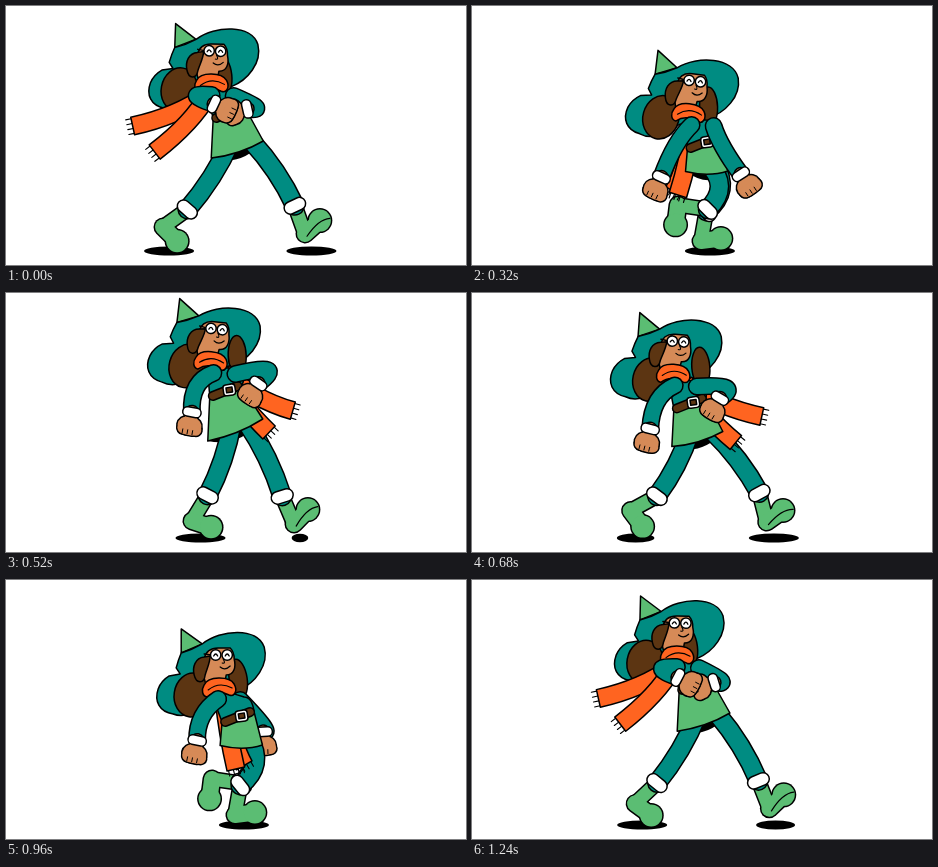
Recreate the animation shown at these times as an HTML page with a canvas. Size 460x259 px, loop 1280 ms.

```html
<!DOCTYPE html>
<html lang="en">
<head>
<meta charset="utf-8">
<title>Walk cycle</title>
<style>
html, body { margin: 0; width: 100%; height: 100%; overflow: hidden; background: #fff; }
canvas { display: block; width: 460px; height: 259px; }
</style>
</head>
<body>
<canvas id="stage" width="460" height="259"></canvas>
<script>
const LOOP = 1280, HALF = LOOP / 2, STEP = 40, INK = 1.5;
const TEAL = '#008c82', GREEN = '#5bbd73', ORANGE = '#ff6420', SKIN = '#d68a57', HAIR = '#5c3512', BLACK = '#000', WHITE = '#fff';
const c = document.getElementById('stage').getContext('2d');
c.lineJoin = c.lineCap = 'round';

// Key poses; each row starts with its time in ms.
// Head height over one step
const BOUNCE = [[0, 45], [160, 63], [240, 73], [320, 75], [400, 54], [520, 36], [600, 43]];
// Heel position and boot tilt over two steps
const BOOT = [
  [0, 299, 228, -42], [160, 261, 235, -8], [320, 229, 235, -7], [400, 200, 236, -8], [520, 186, 228, 18],
  [640, 157, 221, 45], [840, 182, 203, 82], [960, 206, 199, 97], [1040, 251, 214, 48], [1160, 288, 231, -46]
];
// Elbow and hand, measured from the head
const ARM_L = [
  [0, -18, 45, 12, 59], [160, -35, 65, -5, 69], [320, -19, 65, -39, 109],
  [520, -20, 58, -27, 97], [840, -21, 62, -35, 105], [1040, -18, 61, -18, 92]
];
const ARM_R = [
  [0, 41, 56, 19, 61], [160, 39, 69, 40, 96], [320, 29, 67, 54, 105],
  [520, 51, 41, 34, 66], [840, 44, 57, 37, 75], [1040, 41, 76, 45, 98]
];

const mod = (t, period) => ((t % period) + period) % period;
const clamp = x => Math.max(0, Math.min(1, x));
const rad = deg => deg * Math.PI / 180;
const polar = deg => [Math.cos(rad(deg)), Math.sin(rad(deg))];
// Cosine that peaks at the given time
const wave = (t, peak, period = LOOP) => Math.cos(2 * Math.PI * (t - peak) / period);

// Periodic cubic that never overshoots its keys
function sample(keys, time, period = LOOP) {
  const n = keys.length, t = mod(time, period);
  let i = n - 1;
  while (keys[i][0] > t) i--;
  const row = k => keys[(k + n) % n];
  const gap = k => mod(row(k + 1)[0] - row(k)[0], period);
  const h = gap(i), u = (t - row(i)[0]) / h, v = 1 - u;
  const slope = (k, j) => (row(k + 1)[j] - row(k)[j]) / gap(k);
  const tangent = (k, j) => {
    const a = slope(k - 1, j), b = slope(k, j);
    return a * b > 0 ? 2 * a * b / (a + b) : 0;
  };
  return row(i).slice(1).map((a, k) => {
    const j = k + 1, b = row(i + 1)[j];
    return a * v * v * (1 + 2 * u) + b * u * u * (3 - 2 * u)
      + h * u * v * (v * tangent(i, j) - u * tangent(i + 1, j));
  });
}

const add = (p, x, y) => [p[0] + x, p[1] + y];
const off = (p, d, k) => add(p, d[0] * k, d[1] * k);
const mix = (a, b, k) => [a[0] + (b[0] - a[0]) * k, a[1] + (b[1] - a[1]) * k];
const dist = (a, b) => Math.hypot(b[0] - a[0], b[1] - a[1]);
const unit = (a, b) => {
  const d = dist(a, b) || 1;
  return [(b[0] - a[0]) / d, (b[1] - a[1]) / d];
};
const normal = d => [-d[1], d[0]];
// Control point of a quadratic that passes through m
const through = (a, m, b) => [2 * m[0] - (a[0] + b[0]) / 2, 2 * m[1] - (a[1] + b[1]) / 2];

const svg = d => new Path2D(d);
const seg = (a, b) => svg(`M${a}L${b}`);
const curve = (a, m, b) => svg(`M${a}Q${m} ${b}`);
function oval(x, y, rx, ry, tilt = 0) {
  const p = new Path2D();
  p.ellipse(x, y, rx, ry, tilt, 0, 7);
  return p;
}
function line(path, width = INK, color = BLACK) {
  c.lineWidth = width;
  c.strokeStyle = color;
  c.stroke(path);
}
function fill(path, color) {
  c.fillStyle = color;
  c.fill(path);
}
function shape(path, color) {
  fill(path, color);
  line(path);
}
// Thick strokes merged under one outline
function blob(parts, color) {
  parts.forEach(([p, w]) => line(p, w + 2 * INK));
  parts.forEach(([p, w]) => line(p, w, color));
}
function cuff(p, dir, half, width) {
  const n = normal(dir);
  blob([[seg(off(p, n, -half), off(p, n, half)), width]], WHITE);
}
function placed([x, y], angle, paint) {
  c.save();
  c.translate(x, y);
  c.rotate(angle);
  paint();
  c.restore();
}

function arm(shoulder, keys, t, head) {
  const [ex, ey, hx, hy] = sample(keys, t);
  const elbow = add(head, ex, ey), hand = add(head, hx, hy);
  const d = unit(elbow, hand), n = normal(d);
  const wrist = off(hand, d, -14), tip = off(hand, d, 3);
  blob([[curve(shoulder, through(shoulder, elbow, wrist), wrist), 15]], TEAL);
  blob([
    [seg(wrist, hand), 12],
    [seg(off(hand, n, -3), off(hand, n, 3)), 18],
    [seg(off(tip, n, -7), off(tip, n, 6)), 11]
  ], SKIN);
  [-4, 1, 6].forEach(i => line(seg(off(off(hand, d, 4), n, i), off(off(hand, d, 8), n, i)), 1));
  cuff(wrist, d, 4.5, 8);
}

function leg(t, pelvis) {
  const [x, y, tilt] = sample(BOOT, t);
  const heel = [x, y], d = polar(tilt), n = normal(d), toe = off(heel, d, 20);
  const ankle = off(heel, polar(.85 * tilt - 74), 30);
  const hip = add(pelvis, 4 + 11 * wave(t, 60), -8);
  const bend = Math.max(3, (80 - dist(hip, ankle)) * .35);
  const knee = off(mix(hip, ankle, .5), normal(unit(hip, ankle)), -bend);
  const m = through(hip, knee, ankle);
  blob([[seg(ankle, heel), 13], [seg(heel, toe), 16], [seg(toe, toe), 22]], GREEN);
  if (tilt < -20) line(curve(off(heel, n, 3), off(toe, n, -2), off(off(toe, d, 9), n, 5)), 1.2);
  blob([[curve(hip, m, ankle), 17]], TEAL);
  cuff(ankle, unit(m, ankle), 5, 11);
}

// Full while the boot is down, shrinking as it lifts
function shadow(time) {
  const t = mod(time, LOOP), [x, , tilt] = sample(BOOT, t);
  const r = t < HALF ? 25 : 25 * clamp(Math.max((800 - t) / 160, (t - 1100) / 180));
  if (r > .5) fill(oval(x + 10 * polar(tilt)[0] - 1, 245, r, Math.min(4.5, r * .5)), BLACK);
}

function tail(root, x, y, mx, my) {
  const mid = add(root, x * mx, y * my), end = add(root, x, y), w = 9;
  const u = unit(root, mid), v = unit(mid, end);
  const nu = normal(u), nv = normal(v), nm = unit([0, 0], add(nu, ...nv));
  for (let i = -7.5; i < 9; i += 5) {
    const p = off(end, nv, i);
    line(seg(p, off(p, v, 5.5)), 1.1);
  }
  shape(svg(`M${off(root, nu, w)}Q${off(mid, nm, w)} ${off(end, nv, w)}L${off(end, nv, -w)}Q${off(mid, nm, -w)} ${off(root, nu, -w)}Z`), ORANGE);
}
function tails(t, head) {
  const s = Math.sin(Math.PI / 2 * wave(t, 675)), root = add(head, 1 + 7 * s, 43);
  tail(root, 76 * s, 70 - 38 * s * s, .42, .7);
  tail(root, 52 * s - 2, 72 - 14 * s * s, .3, .5);
}

function hat(sway) {
  shape(svg('M-40-2L-40-26L-19-11Z'), GREEN);
  shape(svg('M-40-2Q-29-5-19-11C0-26 36-28 43-8C48 10 34 28 18 35L-10 45C-24 59-38 63-48 59C-62 57-67 46-63 34Q-60 26-52 21L-41 19L-45 13Q-43 5-40-2Z'), TEAL);
  shape(oval(-29 - 5 * sway, 40, 18, 22, .15), HAIR);
  shape(oval(17 - 8 * sway, 24, 9, 20, -.15), HAIR);
}

function face() {
  shape(svg('M-17 4Q-15-7-3-7L9-7Q13-3 13 4C15 12 13 20 5 20L3 32L-14 34L-19 16Z'), SKIN);
  shape(svg('M-17 2C-26 3-29 12-27 20C-25 29-17 29-16 20C-14 13-11 7-11 1Z'), HAIR);
  line(seg([-17, -1], [-10, 0]));
  [-5.5, 6].forEach(x => {
    shape(oval(x, 0, 5.2, 5.2), WHITE);
    line(curve([x - 2, 1], [x, -3], [x + 2, 1]), 1.3);
  });
  line(svg('M2 4Q5 9 1 8'), 1.1);
  line(svg('M-1 12Q4 16 9 11'), 1.2);
}

function scarf() {
  shape(svg('M-17 30C-13 21 8 21 13 29C17 36 13 42 8 40C0 36-8 37-14 42C-19 41-20 35-17 30Z'), ORANGE);
  line(svg('M-13 35Q-2 26 11 33'), 1.1);
}

function torso({ sl, sr, bl, br, hl, hr }) {
  shape(svg(`M${sl}Q${add(mix(sl, sr, .5), 0, -6)} ${sr}Q${add(sr, 8, 0)} ${br}L${bl}Z`), TEAL);
  shape(svg(`M${bl}L${br}L${hr}Q${add(mix(hl, hr, .55), 0, 6)} ${hl}Z`), GREEN);
  blob([[seg(add(bl, 3, 0), add(br, -4, 0)), 7]], HAIR);
  placed(mix(bl, br, .61), -.15, () => {
    const buckle = new Path2D();
    buckle.roundRect(-6, -5.5, 12, 11, 3);
    shape(buckle, WHITE);
    shape(svg('M-3-2.5H3V2.5H-3Z'), HAIR);
  });
}

// Body points hang from the head; the skirt shortens as she sinks
function pose(t) {
  const y = sample(BOUNCE, t, HALF)[0], sink = (y - 36) / 40;
  const head = [213 + 4 * wave(t, 240) + 6 * wave(t, 300, HALF), y];
  const tilt = rad(3.5 + 3.7 * wave(t, 400));
  const bl = add(head, 1 - 67 * Math.sin(tilt), 67);
  const hl = [bl[0] - 2, y + 112 - 22 * sink];
  return {
    head, tilt, bl, hl,
    br: add(bl, 32, -10),
    hr: add(hl, 55 - 13 * sink, 22 * (sink - 1)),
    sl: add(head, -9, 41),
    sr: add(head, 23, 42)
  };
}

function draw(t) {
  const p = pose(t), { head, tilt, hl, hr, sl, sr } = p;
  const pelvis = mix(hl, hr, .5);
  const scarfFront = t < 240 || t > 1160;
  const armBehind = (t > 80 && t < 240) || (t > 920 && t < 1180);
  const farArm = () => arm(add(sr, -4, 3), ARM_R, t, head);

  fill(svg('M0 0H460V259H0Z'), WHITE);
  shadow(t);
  shadow(t + HALF);
  placed(head, tilt, () => hat(wave(t, 0)));
  fill(curve(hl, add(pelvis, 4, 18), hr), BLACK);
  if (armBehind) farArm();
  leg(t, pelvis);
  leg(t + HALF, pelvis);
  if (!scarfFront) tails(t, head);
  torso(p);
  if (scarfFront) tails(t, head);
  placed(head, tilt, () => { face(); scarf(); });
  if (!armBehind) farArm();
  arm(add(sl, 6, 3), ARM_L, t, head);
}

const start = performance.now();
function frame() {
  const t = (performance.now() - start) % LOOP;
  draw(Math.floor(t / STEP) * STEP);
  requestAnimationFrame(frame);
}
frame();
</script>
</body>
</html>
```
